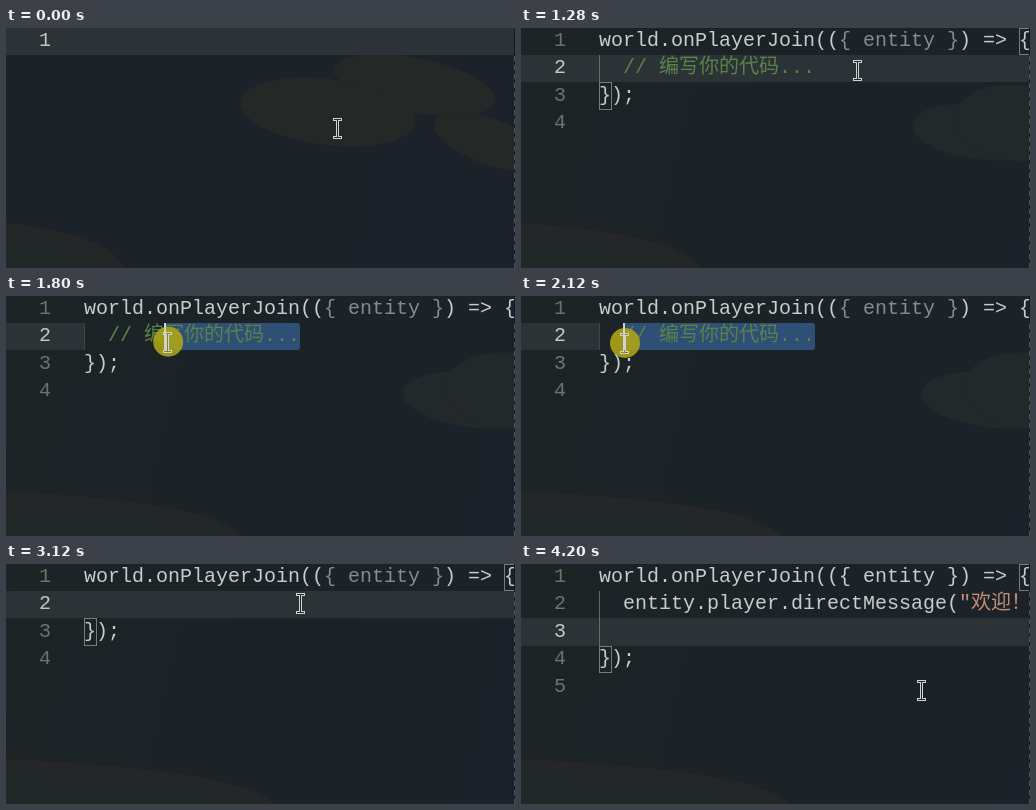
An HTML page with a canvas that plays this animation: 509x240 px, repeating every 4.7 s.

```html
<!DOCTYPE html>
<html lang="zh-CN">
<head>
<meta charset="utf-8">
<style>
html, body { margin: 0; width: 100%; height: 100%; overflow: hidden; background: #1b2329; }
canvas { display: block; }
</style>
</head>
<body>
<canvas id="stage" width="509" height="240"></canvas>
<script>
const ctx = document.getElementById('stage').getContext('2d');
const LOOP = 4700, LEFT = 78, COL = 12, INDENT = LEFT + 2 * COL;
const INK = '#c9cccc', FADED = '#878b8b', COMMENT = '#5d8149', STRING = '#c58d75';
const NOTE = '// 编写你的代码...';

ctx.font = '20px "Liberation Mono", "Noto Sans CJK SC", monospace';

// Caret positions along the comment
const stops = [...NOTE, ''].map((_, i) => INDENT + ctx.measureText(NOTE.slice(0, i)).width);
const NOTE_END = stops[stops.length - 1];

const within = (t, a, b) => t >= a && t < b;
const progress = (t, a, b) => Math.max(0, Math.min(1, (t - a) / (b - a)));
const smooth = p => p * p * (3 - 2 * p);
const easeOut = p => p * (2 - p);
const rowTop = n => Math.round((n - 1) * 27.2);
const baseline = n => Math.round(18 + (n - 1) * 27.4);

function mouseAt(t) {
  let x = 332, y = 100;
  const glide = (start, end, toX, toY, bow = 0) => {
    const p = progress(t, start, end), e = easeOut(p);
    x += (toX - x) * e + bow * Math.sin(Math.PI * p);
    y += (toY - y) * e;
  };
  glide(1160, 1280, 337, 42);
  glide(1480, 2120, 104, 47);
  glide(2600, 2720, 295, 39);
  glide(3920, 4200, 401, 126, 45);
  return [x, y];
}

function rect(color, x, y, w, h) {
  ctx.fillStyle = color;
  ctx.fillRect(x, y, w, h);
}

function row(n, width = 508) {
  rect('#2c3336', 0, rowTop(n), width, rowTop(n + 1) - rowTop(n));
}

function lobe(color, x, y, rx, ry, tilt) {
  ctx.fillStyle = color;
  ctx.beginPath();
  ctx.ellipse(x, y, rx, ry, tilt, 0, 7);
  ctx.fill();
}

function hill(color, width, top) {
  ctx.fillStyle = color;
  ctx.beginPath();
  ctx.moveTo(0, top);
  ctx.quadraticCurveTo(width * .9, top + 12, width, 240);
  ctx.lineTo(0, 240);
  ctx.fill();
}

function backdrop(t) {
  const shade = ctx.createLinearGradient(0, 0, 509, 120);
  shade.addColorStop(0, t < 720 ? '#1b2329' : '#1c2426');
  shade.addColorStop(1, '#1b2229');
  rect(shade, 0, 0, 509, 240);

  if (t < 1160) {
    const dx = 13 * progress(t, 0, 800);
    const color = t < 720 ? '#242827' : '#21272a';
    lobe(color, 409 + dx, 57, 82, 27, .2);
    lobe(color, 322 + dx, 84, 88, 33, .12);
    lobe(color, 485 + dx, 114, 60, 23, .35);
  } else if (t < 2680) {
    const dx = 9 * progress(t, 1280, 2120);
    lobe('#23282a', 465 + dx, 104, 74, 28, .1);
    lobe('#23282a', 500 + dx, 95, 67, 38, .1);
  }
  const width = 118 + 150 * smooth(progress(t, 400, 2400));
  hill('#252627', width, 195);
  hill('#222727', width - 3, 201);
}

function write(n, x, parts) {
  for (const [text, color] of parts) {
    ctx.fillStyle = color;
    ctx.fillText(text, x, baseline(n));
    x += ctx.measureText(text).width;
  }
}

function bracketBox(col, n) {
  const y = rowTop(n);
  ctx.strokeStyle = '#777c78';
  ctx.lineWidth = 1;
  ctx.strokeRect(LEFT + col * COL + .5, y + .5, COL, rowTop(n + 1) - y - 1);
}

const caret = (x, n) => rect('#d0d2d0', x, rowTop(n), 2, 27);

function pointer(x, y, pressed) {
  if (pressed) lobe('rgba(172, 164, 24, .9)', x, y, 15, 15, 0);
  x = Math.round(x) - .5;
  y = Math.round(y);
  for (const [color, width, end] of [['#d0d2d0', 3, 4.5], [pressed ? '#8a8420' : '#22282a', 1, 3.5]]) {
    ctx.strokeStyle = color;
    ctx.lineWidth = width;
    ctx.beginPath();
    for (const side of [-9, 9]) {
      ctx.moveTo(x - end, y + side + .5);
      ctx.lineTo(x + end, y + side + .5);
    }
    ctx.moveTo(x, y - 9);
    ctx.lineTo(x, y + 9);
    ctx.stroke();
  }
}

function draw(t) {
  const [mx, my] = mouseAt(t);
  const typed = t >= 720, pasted = t >= 3640;
  const selecting = within(t, 1560, 2960);
  const active = !typed ? 1 : t < 1240 ? 4 : pasted ? 3 : 2;
  const lines = pasted ? 5 : typed ? 4 : 1;
  const closing = lines - 1;
  const gap = x => Math.abs(x - mx - 2);
  const edge = t < 2600 ? stops.reduce((a, b) => gap(b) < gap(a) ? b : a) : INDENT;

  backdrop(t);
  row(active, selecting ? LEFT : 508);
  if (selecting) {
    ctx.fillStyle = '#2e4f76';
    ctx.beginPath();
    ctx.roundRect(edge, rowTop(2), NOTE_END - edge, 27, 3);
    ctx.fill();
  }

  for (let n = 1; n <= lines; n++) write(n, 33, [[String(n), n === active ? '#c5c8c5' : '#6c746a']]);

  if (typed) {
    const param = within(t, 880, 3920) ? FADED : INK;
    write(1, LEFT, [['world.onPlayerJoin((', INK], ['{ entity }', param], [') => {', INK]]);
    write(closing, LEFT, [['});', INK]]);
    if (pasted) {
      write(2, INDENT, [['entity.player.directMessage(', INK], ['"欢迎！")', STRING]]);
    } else if (t < 2960) {
      write(2, INDENT, [[NOTE, COMMENT]]);
    }
    if (pasted || t < 2960) {
      const lit = pasted || within(t, 1240, 1560);
      rect(lit ? '#646a69' : '#404647', LEFT, 27, 1, rowTop(closing) - 27);
    }
    if (within(t, 1240, 1560) || t >= 2960) {
      bracketBox(35, 1);
      bracketBox(0, closing);
    }
  }

  pointer(mx, my, within(t, 1560, 2600) || within(t, 3320, 3400));
  if (within(t, 200, 720)) caret(LEFT, 1);
  if (within(t, 720, 1160)) caret(LEFT, 4);
  if (selecting) caret(edge, 2);
  if (within(t, 3320, 3640)) caret(INDENT, 2);
  if (within(t, 3640, 3920)) caret(INDENT, 3);

  rect('#151b1f', 508, 0, 1, 240);
  for (let y = 28; y < 240; y += 9) rect('#4d5452', 508, y, 1, 5);
}

function frame(now) {
  draw(Math.floor(now % LOOP / 40) * 40);
  requestAnimationFrame(frame);
}
requestAnimationFrame(frame);
</script>
</body>
</html>
```
